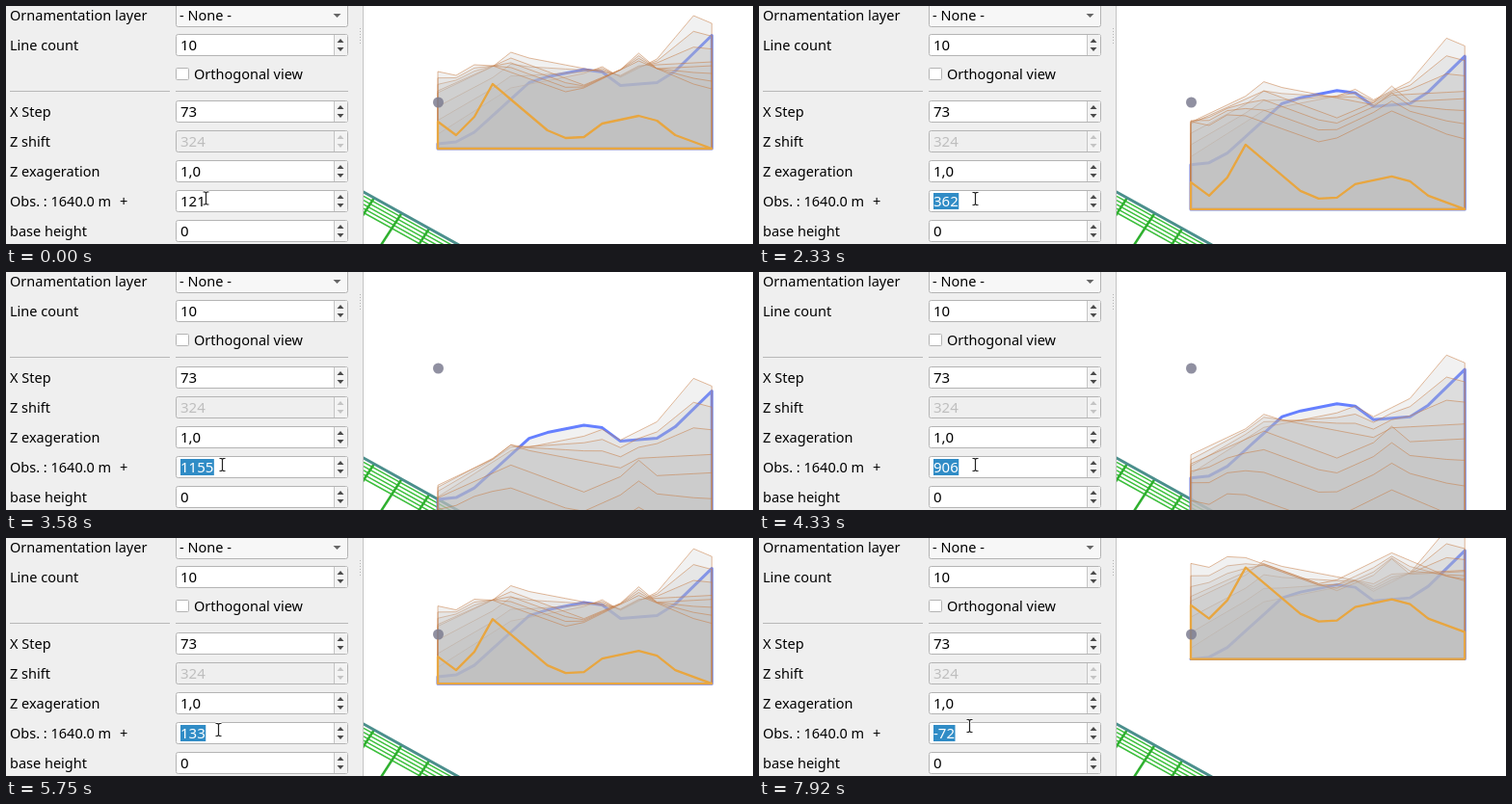
Write an HTML page that moves like this. It is 775 by 247 pixels and loops after 8000 ms.

```html
<!DOCTYPE html>
<html>
<head>
<meta charset="utf-8">
<style>
html, body { margin: 0; width: 100%; height: 100%; overflow: hidden; background: #fff; }
svg { display: block; }
text { font: 14.5px "Noto Sans", "Open Sans", sans-serif; fill: #000; white-space: pre; }
.value { font-size: 15px; }
.off { fill: #bebebe; }
.box { fill: #fff; stroke: #b4b4b4; }
</style>
</head>
<body>
<svg id="stage" width="775" height="247" viewBox="0 0 775 247"></svg>
<script>
const LOOP = 8000, STEP = 80;
const stage = document.getElementById('stage');

function add(tag, attrs, text) {
  const el = document.createElementNS('http://www.w3.org/2000/svg', tag);
  for (const name in attrs) el.setAttribute(name, attrs[name]);
  if (text !== undefined) el.textContent = text;
  return stage.appendChild(el);
}
const line = (d, stroke, width = 1) => add('path', { d, stroke, 'stroke-width': width, fill: 'none' });
const label = (x, y, text, cls = '') => add('text', { x, y, class: cls }, text);
const lerp = (a, b, p) => a + (b - a) * p;

// Map corner
for (let i = 1; i <= 5; i++) line(`M371 ${193 + i * 4.3}l110 61`, '#3cbf3c', 1.5);
for (let i = 0; i < 3; i++) line(`M${382 + i * 28.5} ${199 + i * 16}l-22 34`, '#2fb02f', 2.5);
line('M370 192.5L470 248', '#4b8f8c', 3);

// Ridges are given by key points [station, screen height at REF], from near (0) to far (9).
// The ones between are blended from their neighbours.
const REF = 121, LEFT = 448, DX = 18.95, STATIONS = 16, RIDGES = 10;
const keyRidges = {
  0: [[0, 120], [1, 134], [2, 115], [3, 81], [6, 129], [7, 137], [8, 136], [9, 122], [11, 114], [12, 119], [13, 134], [15, 148]],
  1: [[0, 68], [1, 72], [2, 61], [3, 62], [7, 89], [8, 85], [11, 57], [14, 81], [15, 86]],
  4: [[0, 88], [4, 54], [8, 82], [10, 66], [11, 49], [12, 65], [15, 62]],
  5: [[0, 90], [3, 63], [4, 48], [5, 54], [10, 72], [11, 62], [15, 58]],
  8: [[0, 133], [4, 85], [8, 70], [9, 63], [10, 74], [12, 55], [14, 10], [15, 18]],
  9: [[0, 143], [1, 141], [2, 131], [5, 79.5], [6, 73.5], [8, 66], [9, 68.5], [10, 82.5], [12, 79.5], [13, 67.5], [15, 30.5]]
};

function heightAt(points, x) {
  const i = Math.max(1, points.findIndex(p => p[0] >= x));
  const [a, b] = [points[i - 1], points[i]];
  return lerp(a[1], b[1], (x - a[0]) / (b[0] - a[0]));
}

function profile(k) {
  const keys = Object.keys(keyRidges).map(Number);
  const lo = keys.filter(n => n <= k).pop(), hi = keys.find(n => n >= k);
  const p = lo === hi ? 0 : (k - lo) / (hi - lo);
  return Array.from({ length: STATIONS }, (_, x) =>
    lerp(heightAt(keyRidges[lo], x), heightAt(keyRidges[hi], x), p));
}

const ridges = [];
for (let k = RIDGES - 1; k >= 0; k--) {
  const [stroke, width] = k === 9 ? ['#6680ff', 3] : k === 0 ? ['#e8a640', 2.3] : ['rgba(200,125,70,.6)', 0.9];
  const path = add('path', {
    fill: 'rgba(185,185,185,.2)', stroke, 'stroke-width': width, 'stroke-linejoin': 'round'
  });
  ridges.push({ path, ys: profile(k), scale: 0.261 / (1 + 0.211 * k) });
}
add('circle', { cx: 448.5, cy: 100, r: 5.5, fill: 'rgba(125,125,145,.85)' });

// Settings panel
add('rect', { width: 370, height: 247, fill: '#efefef' });
line('M370.5 0V247', '#c4c4c4');
line('M367.5 23V41', '#b4b4b4').setAttribute('stroke-dasharray', '1 2');
line('M4 88.5H170M176 88.5H355', '#b8b8b8');

function spinBox(y, cls) {
  const box = add('rect', { x: 176.5, y: y - 11.5, width: 178, height: 22, rx: 2, class: 'box' });
  if (cls) box.style.fill = '#efefef';
  add('rect', { x: 341, y: y - 11, width: 13, height: 21, fill: '#f3f3f3' });
  line(`M340.5 ${y - 11}v21`, '#c4c4c4');
  add('path', {
    d: `M343.5 ${y - 3}h7l-3.5 -4zM343.5 ${y + 2}h7l-3.5 4z`, fill: cls ? '#c4c4c4' : '#4a4a4a'
  });
}

label(4, 15, 'Ornamentation layer');
add('rect', { x: 176.5, y: -5, width: 178, height: 26.5, rx: 2, class: 'box' }).style.fill = '#f7f7f7';
add('path', { d: 'M339.5 8h8l-4 4z', fill: '#666' });
label(180, 15, '- None -');
add('rect', { x: 176.5, y: 64.5, width: 13, height: 12, rx: 1, class: 'box' });
label(195, 76, 'Orthogonal view');

const rows = [
  [41, 'Line count', '10'], [110, 'X Step', '73'], [141, 'Z shift', '324', 'off'],
  [172, 'Z exageration', '1,0'], [203, 'Obs. : 1640.0 m', ''], [234, 'base height', '0']
];
for (const [y, name, value, cls = ''] of rows) {
  label(4, y + 5, name);
  spinBox(y, cls);
  label(181, y + 5, value, 'value ' + cls);
}
label(118, 208, '+');
const highlight = add('rect', { x: 181, y: 194, height: 17, fill: '#308cc6' });
const field = label(181, 208, '', 'value');
const beamShape = 'M-3 -6.5H-1L0 -5.5L1 -6.5H3M0 -5.5V5.5M-3 6.5H-1L0 5.5L1 6.5H3';
const beam = [line(beamShape, '#fff', 3), line(beamShape, '#222', 1.2)];

// Runs of even steps: start time, step count, final value(s)
const obsRuns = [
  [1170, 2, 121], [1420, 1, 133], [1580, 2, 172], [2000, 1, 224], [2170, 1, 302], [2330, 1, 362],
  [2670, 5, 757], [3250, 6, 1234], [4170, 6, 578], [4830, 3, 345], [5170, 4, 226],
  [5670, 2, 133], [5830, 2, 97], [6170, 1, 60], [6500, 2, 5], [6920, 2, -49], [7170, 3, -72]
];
const beamRuns = [[250, 5, 224.5, 200], [5410, 1, 220.5, 199], [7830, 2, 218.5, 195]];

function valuesAt(t, runs, values) {
  for (const [start, count, ...end] of runs) {
    if (t < start) break;
    const p = Math.min(1, (Math.floor((t - start) / STEP) + 1) / count);
    values = values.map((v, i) => lerp(v, end[i], p));
  }
  return values;
}

function draw(t) {
  const selected = t >= obsRuns[0][0];
  const obs = Math.round(valuesAt(t, obsRuns, [selected ? 97 : REF])[0]);
  field.textContent = obs;
  field.style.fill = selected ? '#fff' : '';
  highlight.setAttribute('width', selected ? field.getComputedTextLength() + 0.5 : 0);

  const place = `translate(${valuesAt(t, beamRuns, [207.5, 199.5])})`;
  for (const part of beam) part.setAttribute('transform', place);

  const shifted = ridges.map(r => r.ys.map(y => y + r.scale * (obs - REF)));
  const base = Math.max(...shifted.flat());
  ridges.forEach((r, n) => {
    const top = shifted[n].map((y, i) => `${LEFT + i * DX} ${y}`).join('L');
    r.path.setAttribute('d', `M${LEFT} ${base}L${top}V${base}Z`);
  });
}

function tick() {
  draw(performance.now() % LOOP);
  requestAnimationFrame(tick);
}
tick();
</script>
</body>
</html>
```
